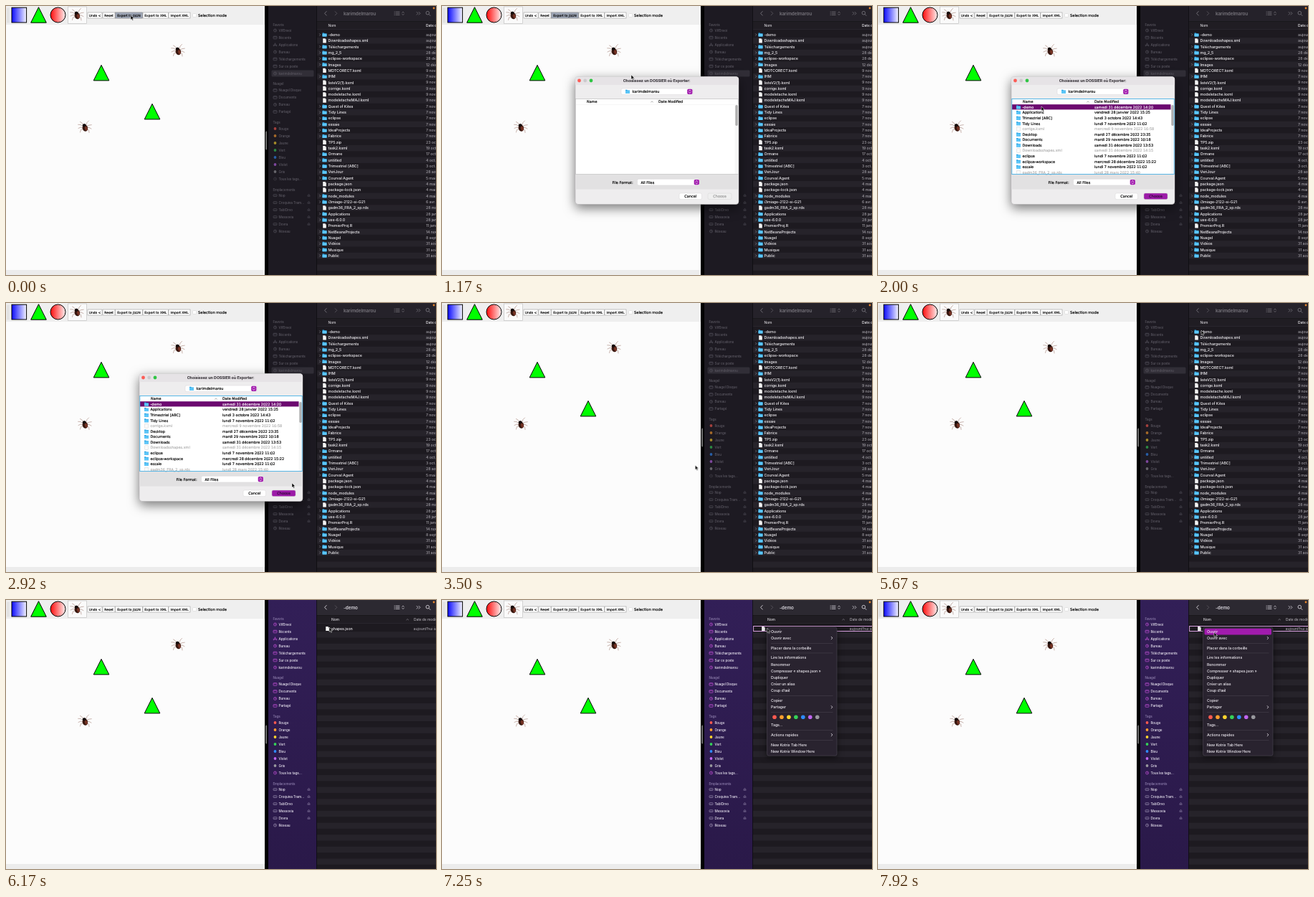
These frames come from a looping animation (600 by 375 pixels, 8000 ms). An HTML page:

```html
<!DOCTYPE html>
<html lang="fr">
<head>
<meta charset="utf-8">
<title>Export to JSON</title>
<style>
html, body { margin: 0; width: 100%; height: 100%; overflow: hidden; background: #000; }
svg { display: block; width: 600px; height: 375px; }
text { font-family: Inter, "Open Sans", sans-serif; font-weight: 500; letter-spacing: -.1px; }
.java text { font-family: "DejaVu Sans", sans-serif; font-weight: 400; letter-spacing: 0; stroke-width: .16px; }
.java text.sys { font-family: Inter, sans-serif; font-weight: 600; }
text.bold { font-weight: 600; }
.line { fill: none; stroke-linecap: round; stroke-linejoin: round; }

.step { animation: 8s step-end infinite; }
.pressed { animation-name: pressed; }
.dialog { animation-name: dialog; }
.files { animation-name: files; }
.picked { animation-name: picked; }
.unfocused { animation-name: unfocused; }
.focused { animation-name: focused; }
.home { animation-name: home; }
.clicked { animation-name: clicked; }
.demo { animation-name: demo; }
.menu { animation-name: menu; }
.hover { animation-name: hover; }
.cursor { animation: cursor 8s ease-in-out infinite; }

@keyframes pressed { 0% { opacity: 1 } 16.6%, 100% { opacity: 0 } }
@keyframes dialog { 0% { opacity: 0 } 10.4% { opacity: 1 } 38.5%, 100% { opacity: 0 } }
@keyframes files { 0% { opacity: 0 } 16.6%, 100% { opacity: 1 } }
@keyframes picked { 0% { opacity: 0 } 23.9%, 100% { opacity: 1 } }
@keyframes unfocused { 0% { opacity: 1 } 72.9%, 100% { opacity: 0 } }
@keyframes focused { 0% { opacity: 0 } 72.9%, 100% { opacity: 1 } }
@keyframes home { 0% { opacity: 1 } 75%, 100% { opacity: 0 } }
@keyframes clicked { 0% { opacity: 0 } 72.9%, 100% { opacity: 1 } }
@keyframes demo { 0% { opacity: 0 } 75%, 100% { opacity: 1 } }
@keyframes menu { 0% { opacity: 0 } 89.6%, 100% { opacity: 1 } }
@keyframes hover { 0% { opacity: 0 } 93.7%, 100% { opacity: 1 } }
@keyframes cursor {
  0%, 6.2% { transform: translate(174px, 13px) }
  14.4%, 16.6% { transform: translate(264px, 96px) }
  22.9%, 25% { transform: translate(228px, 140px) }
  34.4%, 38.5% { transform: translate(399px, 251px) }
  47.5%, 56% { transform: translate(328px, 212.5px) }
  67.5%, 86.5% { transform: translate(451px, 38px) }
  88.7%, 90% { transform: translate(453px, 39px) }
  95%, 100% { transform: translate(469px, 45px) }
}
</style>
</head>
<body>
<svg id="stage" viewBox="0 0 600 375" xmlns="http://www.w3.org/2000/svg"></svg>
<script>
const USER = 'karimdelmarou';
const PURPLE = '#a11bad';

// y is the middle of the line
const text = (x, y, s, size, fill, attrs = '') =>
  `<text x="${x}" y="${y + size * .36}" font-size="${size}" fill="${fill}" stroke="${fill}" stroke-width="0" ${attrs}>${s}</text>`;
const rect = (x, y, w, h, fill, attrs = '') =>
  `<rect x="${x}" y="${y}" width="${w}" height="${h}" fill="${fill}" ${attrs}/>`;
const dot = (x, y, r, fill, attrs = '') => `<circle cx="${x}" cy="${y}" r="${r}" fill="${fill}" ${attrs}/>`;
const line = (d, color, w = .7) => `<path class="line" d="${d}" stroke="${color}" stroke-width="${w}"/>`;
const group = (cls, body) => `<g class="${cls}">${body}</g>`;
const chevron = (x, y, r, color, w) => line(`M${x - r / 2} ${y - r}l${r} ${r}l${-r} ${r}`, color, w);
const folder = (x, y) =>
  `<path d="M${x - 3} ${y - 2.5}h2.2l.8 .7h3v4.3h-6z" fill="#35a9e6"/>` + rect(x - 3, y - 1.1, 6, 3.6, '#5cc6f8', 'rx=".4"');
const file = (x, y) =>
  `<path d="M${x - 2.3} ${y - 3.1}h3l1.6 1.6v4.6h-4.6z" fill="#f4f4f4"/>` + line(`M${x + .7} ${y - 3}v1.5h1.5`, '#aaa', .4);
const upDown = (x, y, color) => line(`M${x - 1.3} ${y - .9}l1.3 -1.4l1.3 1.4M${x - 1.3} ${y + .9}l1.3 1.4l1.3 -1.4`, color, .7);

const triangle = (x, y) =>
  `<path d="M${x} ${y}l10.8 21.5h-21.6z" fill="#0f0" stroke="#000" stroke-width="1"/>`;

const bug = (x, y) => `<g transform="translate(${x} ${y})">` +
  line('M-3 -1L-6 -3L-9.3 -3.2M-3 1L-6 .6L-9 2M-3 3L-5.5 4L-6.5 7.5M-2 -3L-4 -5.500L-6.5 -7' +
       'M3 -1L6 -2.4L9.3 -2.8M3 1L6 1L9 2.6M3 3L5.5 4.4L6 8M2 -3L3 -6L5.5 -8.5', '#a58277', .6) +
  '<g transform="rotate(-14)"><ellipse cx="0" cy="1.6" rx="3.7" ry="4.8" fill="#38170f"/>' +
  '<ellipse cx="1.3" cy="2.6" rx="1.7" ry="3" fill="#7a3526"/>' +
  '<ellipse cx="-.3" cy="-2.4" rx="2.5" ry="2" fill="#150b0a"/></g></g>';

function drawingApp() {
  const buttons = [[114, 20, 'Undo &lt;'], [135, 17, 'Reset'], [152.5, 38, 'Export to JSON'],
    [191, 35.5, 'Export to XML'], [227, 30, 'Import XML']];
  const button = ([x, w, s], fill) => rect(x, 9, w, 8, fill, 'stroke="#8c8c8c" stroke-width=".5"') +
    text(x + w / 2, 13, s, 4.4, '#000', 'text-anchor="middle"');
  return group('java',
    rect(0, 0, 361, 375, '#fcfcfc') + rect(0, 0, 361, 25, '#efefef') + rect(0, 25, 361, .5, '#dcdcdc') +
    rect(0, 368, 361, 7, '#ececec') +
    line('M2 3V23M4 3V23', '#c8c8c8', .6) +
    rect(8, 2.2, 20.6, 20.8, 'url(#blue)', 'stroke="#000"') + triangle(45.5, 1.7) +
    dot(72.5, 12.5, 10.5, 'url(#red)', 'stroke="#000"') +
    rect(86.5, 1, 26, 23.5, '#fafafa', 'stroke="#c4c4c4" stroke-width=".7"') + bug(99, 12) +
    buttons.map(b => button(b, '#fff')).join('') +
    group('step pressed', button(buttons[2], '#9ea6b6')) +
    rect(260.5, 10.5, 5, 5, '#fff', 'rx="1" stroke="#ccc" stroke-width=".5"') +
    text(268, 13, 'Selection mode', 5.15, '#000') +
    triangle(133, 82.4) + triangle(204, 136.4) + bug(240, 62) + bug(110, 168.5));
}

const tagNames = ['Rouge', 'Orange', 'Jaune', 'Vert', 'Bleu', 'Violet', 'Gris'];
const tagColors = ['#ff5a50', '#ff9f2e', '#ffd52e', '#35d158', '#2f8cff', '#c065f0', '#98989d'];
const sections = [
  ['Favoris', 26, 34, ['VifEnvoi', 'Récents', 'Applications', 'Bureau', 'Téléchargements', 'Sur ce poste', USER]],
  ['Nuagel', 108, 117.5, ['Nuagel Disque', 'Documents', 'Bureau', 'Partagé']],
  ['Tags', 162, 171, [...tagNames, 'Tous les tags...']],
  ['Emplacements', 256, 264, ['Nop', 'Croquiva Tram...', 'TablOrvo', 'Messovia', 'Dovra', 'Réseau']]
];

function sideIcon(kind, i, y, color) {
  if (kind == 2 && i < 7) return dot(375.5, y, 1.9, tagColors[i]);
  if (kind == 3 && i < 5) return rect(373, y - 1.4, 5, 3, 'none', `rx=".8" stroke="${color}" stroke-width=".6"`) + line(`M373.5 ${y + .3}h4`, color, .4);
  if (kind == 0 && i == 2) return line(`M375.5 ${y - 2}l-2 4M375.5 ${y - 2}l2 4M373 ${y + .8}h5`, color);
  if ((kind + i) % 3 == 0 || kind > 1) return dot(375.5, y, 2, 'none', `stroke="${color}" stroke-width=".7"`) + line(`M375.5 ${y - 1}v1.2h1`, color, .5);
  return rect(373, y - 1.8, 5, 3.6, 'none', `rx=".7" stroke="${color}" stroke-width=".7"`) + line(`M373.5 ${y - .7}h4`, color, .5);
}

function sidebar(active) {
  const ink = active ? '#ece8f3' : '#5c5963', head = active ? '#8676a5' : '#56535c';
  let out = rect(366, 0, 67.5, 375, active ? 'url(#side)' : '#1d1a22');
  if (!active) out += rect(370.5, 89.5, 59, 9, '#312e37', 'rx="1.5"');
  sections.forEach(([title, ty, y0, items], k) => {
    out += text(372.5, ty, title, 4.5, head, 'class="bold"');
    items.forEach((s, i) => {
      const y = y0 + i * 10, mark = active ? (k == 3 ? '#9b8fb0' : '#c24fd6') : '#55525c';
      out += `<g opacity="${active || k != 2 ? 1 : .6}">${sideIcon(k, i, y, mark)}</g>` + text(380.5, y, s, 4.7, ink);
      if (k == 3 && i < 5) out += line(`M421 ${y}l1.5 -1.8l1.5 1.8zM421 ${y + 1.3}h3`, active ? '#9b8fb0' : '#55525c', .5);
    });
  });
  return out;
}

function titleBar(active, title) {
  const ink = active ? '#d8d5dc' : '#77747c';
  return rect(433.5, 0, 166.5, 21, active ? '#2c2931' : '#25222a') +
    line('M447.2 7.5l-2.6 2.8l2.6 2.8', ink, .9) + chevron(460.5, 10.3, 2.6, '#58555d', .9) +
    text(471, 10.4, title, 6.4, ink, 'class="bold"') +
    line('M542 8.2h.4M542 10.3h.4M542 12.4h.4M544 8.2h5M544 10.3h5M544 12.4h5', ink, .8) + upDown(554, 10.3, ink) +
    chevron(574, 10.3, 1.9, ink, .8) + chevron(577, 10.3, 1.9, ink, .8) +
    dot(588.3, 9.7, 2.3, 'none', `stroke="${ink}" stroke-width=".9"`) + line('M590 11.5l2 2', ink, .9) +
    dot(597, 3, 1.4, '#e8862c');
}

const rowY = i => 40 + i * 8.324;

function stripes() {
  let out = rect(433.5, 21, 166.5, 354, '#1d1a20');
  for (let i = 1; i < 41; i += 2) out += rect(434, rowY(i) - 4.16, 166, 8.32, '#26232a');
  return out + rect(433.5, 21, 166.5, 11.5, '#201d23') + rect(433.5, 21, 166.5, .4, '#111') + rect(433.5, 32.5, 166.5, .4, '#3b383f');
}

// a leading "/" marks a folder
const home = `/-demo|Downloadsshapes.xml|/Téléchargements|/mg_2_5|/eclipse-workspace|/Images|MDTCORECT.kxml|/IHM|listeV2(1).kxml|corrige.kxml|modeletache.kxml|modeletacheMAJ.kxml|/Quest of Kites|/Tidy Lines|/eclipse|/essaie|/IdeaProjects|/Fabrice|TP5.zip|task2.kxml|/Ormane|/untitled|/Trimestriel [ABC]|/VeriJour|/Courval Agent|package.json|package-lock.json|/node_modules|/i3miage-2122-si-G21|gadm36_FRA_2_sp.rds|/Applications|/use-6.0.0|PremierProj.R|/NetBeansProjects|/Nuagel|/Vidéos|/Musique|/Public`.split('|');
const dates = `aujourd’hui|aujourd’hui|aujourd’hui|28 déc.|28 déc.|12 déc.|9 nov.|7 nov.|9 nov.|9 nov.|9 nov.|9 nov.|7 nov.|7 nov.|7 nov.|7 nov.|7 nov.|7 nov.|23 oct.|19 oct.|17 oct.|4 oct.|3 oct.|28 août|5 mai|4 mai|4 mai|4 mai|6 avr.|28 mars|28 janv.|28 janv.|11 janv.|14 nov.|8 sept.|31 août|31 août|31 août`.split('|');

function homeList() {
  let out = stripes() + text(449.5, 27, 'Nom', 5, '#d5d3d8') + text(586, 27, 'Date de modification', 5, '#d5d3d8', 'class="bold"') +
    group('step clicked', rect(434, rowY(0) - 4.1, 166, 8.2, '#8b1a98'));
  home.forEach((name, i) => {
    const y = rowY(i), isDir = name[0] == '/';
    out += (isDir ? chevron(438.2, y, 1.3, '#9a979e', .6) + folder(444.5, y) : file(444.5, y)) +
      text(449.5, y, isDir ? name.slice(1) : name, 5.35, '#f1eff3') + text(586, y, dates[i], 5.25, '#a09da4');
  });
  return out;
}

function demoFolder() {
  return stripes() + text(454, 27, 'Nom', 5, '#dddbe0') +
    line('M558.8 27.8l1.4 -1.3l1.4 1.3', '#99969e', .6) + text(569, 27, 'Date de modification', 5, '#aaa7ae') +
    file(448.5, 40) + text(454, 40, 'shapes.json', 5.35, '#f1eff3') + text(568.5, 40, 'aujourd’hui à 14:20', 5.25, '#a09da4');
}

const entries = [[53, 'Ouvrir avec', 1], [67, 'Placer dans la corbeille'], [80.5, 'Lire les informations'],
  [89.8, 'Renommer'], [99, 'Compresser « shapes.json »'], [108, 'Dupliquer'], [117.2, 'Créer un alias'],
  [126.4, 'Coup d’œil'], [140, 'Copier'], [149.3, 'Partager', 1], [174, 'Tags...'], [188, 'Actions rapides', 1],
  [202, 'New Kotrix Tab Here'], [211, 'New Kotrix Window Here']];

function contextMenu() {
  const ink = '#eeeaf1';
  return rect(434.6, 36.5, 170, 7, 'none', 'stroke="#d7a0df" stroke-width="1"') +
    `<g style="filter:drop-shadow(0 2px 4px #0009)">${rect(453.5, 38, 97.5, 179, '#29232f', 'rx="2.5" stroke="#57515e" stroke-width=".5"')}</g>` +
    group('step hover', rect(455.5, 39.8, 93.5, 8.6, PURPLE, 'rx="1.5"')) +
    text(459, 44, 'Ouvrir', 5.3, ink) +
    entries.map(([y, s, sub]) => text(459, y, s, 5.3, ink) + (sub ? chevron(544, y, 1.7, ink, .8) : '')).join('') +
    [60, 73.7, 133.3, 156.2, 181, 195].map(y => rect(459, y, 86.5, .5, '#4c4653')).join('') +
    tagColors.map((c, i) => dot(464 + i * 9.95, 163.3, 2.8, c)).join('');
}

const exportRows = `/-demo|samedi 31 décembre 2022 14:20
/Applications|vendredi 28 janvier 2022 15:25
/Trimestriel [ABC]|lundi 3 octobre 2022 14:43
/Tidy Lines|lundi 7 novembre 2022 11:02
corrige.kxml|mercredi 9 novembre 2022 16:58
/Desktop|mardi 27 décembre 2022 23:35
/Documents|mardi 29 novembre 2022 10:18
/Downloads|samedi 31 décembre 2022 13:53
Downloadsshapes.xml|samedi 31 décembre 2022 14:15
/eclipse|lundi 7 novembre 2022 11:02
/eclipse-workspace|mercredi 28 décembre 2022 15:22
/essaie|lundi 7 novembre 2022 11:02
gadm36_FRA_2_sp.rds|lundi 28 mars 2022 15:40`.split('\n').map(r => r.split('|'));

function exportRow([name, date], i, ink) {
  const y = 141 + i * 7.58, isDir = name[0] == '/';
  const color = ink || (isDir ? '#000' : '#b0b0b0');
  return (isDir ? folder(196, y) : `<g opacity=".55">${rect(193.8, y - 2.8, 4.4, 5.6, '#f6f6f6', 'stroke="#999" stroke-width=".4"')}</g>`) +
    text(201.5, y, isDir ? name.slice(1) : name, 4.95, color) + text(302, y, date, 4.95, color);
}

function popup(x, y, w, label, lx) {
  return rect(x, y, w, 8.6, '#fff', 'rx="2" stroke="#cfcdcf" stroke-width=".4"') +
    rect(x + w - 7.8, y + .7, 7.2, 7.2, PURPLE, 'rx="1.6"') + upDown(x + w - 4.2, y + 4.3, '#fff') +
    text(lx, y + 4.4, label, 5, '#000');
}

function dialog() {
  const button = (x, w, s, fill, ink) => rect(x, 261, w, 8.6, fill, 'rx="2" stroke="#d0ced0" stroke-width=".4"') +
    text(x + w / 2, 265.4, s, 5, ink, 'text-anchor="middle"');
  return `<g style="filter:drop-shadow(0 5px 8px #0008)">${rect(186, 98.5, 228, 178, '#eeedee', 'rx="4" stroke="#a9a7a9" stroke-width=".5"')}</g>` +
    '<path d="M186 110v-7.5a4 4 0 0 1 4 -4h220a4 4 0 0 1 4 4v7.5z" fill="#e6e3e6"/>' +
    dot(191.5, 104, 2.4, '#fc5b55') + dot(199.7, 104, 2.4, '#cdcacd') + dot(208, 104, 2.4, '#30c545') +
    text(299.5, 104, 'Choisissez un DOSSIER où Exporter:', 5.35, '#363238', 'class="sys" text-anchor="middle"') +
    popup(250, 115, 100, USER, 265.5) + folder(259, 119.3) +
    rect(186.3, 234.5, 227.4, 21, '#e2e1e2') +
    rect(186.4, 129.5, 227.2, 105, '#fff', 'stroke="#b8b8b8" stroke-width=".6"') + text(202, 133.4, 'Name', 4.9, '#000') +
    line('M291.6 134l1.4 -1.3l1.4 1.3', '#777', .6) + text(302, 133.4, 'Date Modified', 4.9, '#000') +
    rect(300, 130.5, .4, 6, '#ddd') + rect(186.4, 137, 222, .3, '#e2e2e2') +
    rect(408.5, 137, 5, 97, '#f7f7f7') + rect(409.3, 138, 3.5, 29, '#b0b0b0', 'rx="1.7"') +
    group('step files', exportRows.map((r, i) => exportRow(r, i)).join('')) +
    group('step picked', rect(187, 137.2, 221.5, 7.2, '#6c0a70') + exportRow(exportRows[0], 0, '#fff') +
      rect(186.8, 129.5, 226.4, 105, 'none', 'stroke="#4db4e8" stroke-width=".9"')) +
    text(237.5, 246, 'File Format:', 5, '#000') +
    popup(272.5, 241.3, 87, 'All Files', 277.5) +
    button(331, 31.5, 'Cancel', '#fff', '#000') + button(371, 33, 'Choose', '#efefef', '#9a9a9a') +
    group('step picked', button(371, 33, 'Choose', '#9c1ba8', '#33083a'));
}

const gradient = (id, dir, a, b) =>
  `<linearGradient id="${id}" ${dir}><stop stop-color="${a}"/><stop offset="1" stop-color="${b}"/></linearGradient>`;

document.getElementById('stage').innerHTML =
  '<defs>' + gradient('blue', '', '#0a0aff', '#f4f4ff') + gradient('red', '', '#ff0a0a', '#fff0f0') +
  gradient('side', 'x2="0" y2="1"', '#321f57', '#2a1949') + '</defs>' +
  drawingApp() + rect(361, 0, 5, 375, '#000') + rect(362, 174.5, 2, 26, '#6a6a6a', 'rx="1"') +
  group('step unfocused', sidebar(false)) + group('step focused', sidebar(true)) +
  group('step home', homeList() + titleBar(false, USER) + group('step focused', titleBar(true, USER))) +
  group('step demo', demoFolder() + titleBar(true, '-demo')) +
  rect(433.2, 0, .6, 375, '#0d0c10') +
  group('step menu', contextMenu()) +
  group('step dialog java', dialog()) +
  '<path class="cursor" d="M0 0v6.3l1.5 -1.3l1 2.3l1.1 -.5l-1 -2.2h2z" fill="#000" stroke="#fff" stroke-width=".5"/>';
</script>
</body>
</html>
```
